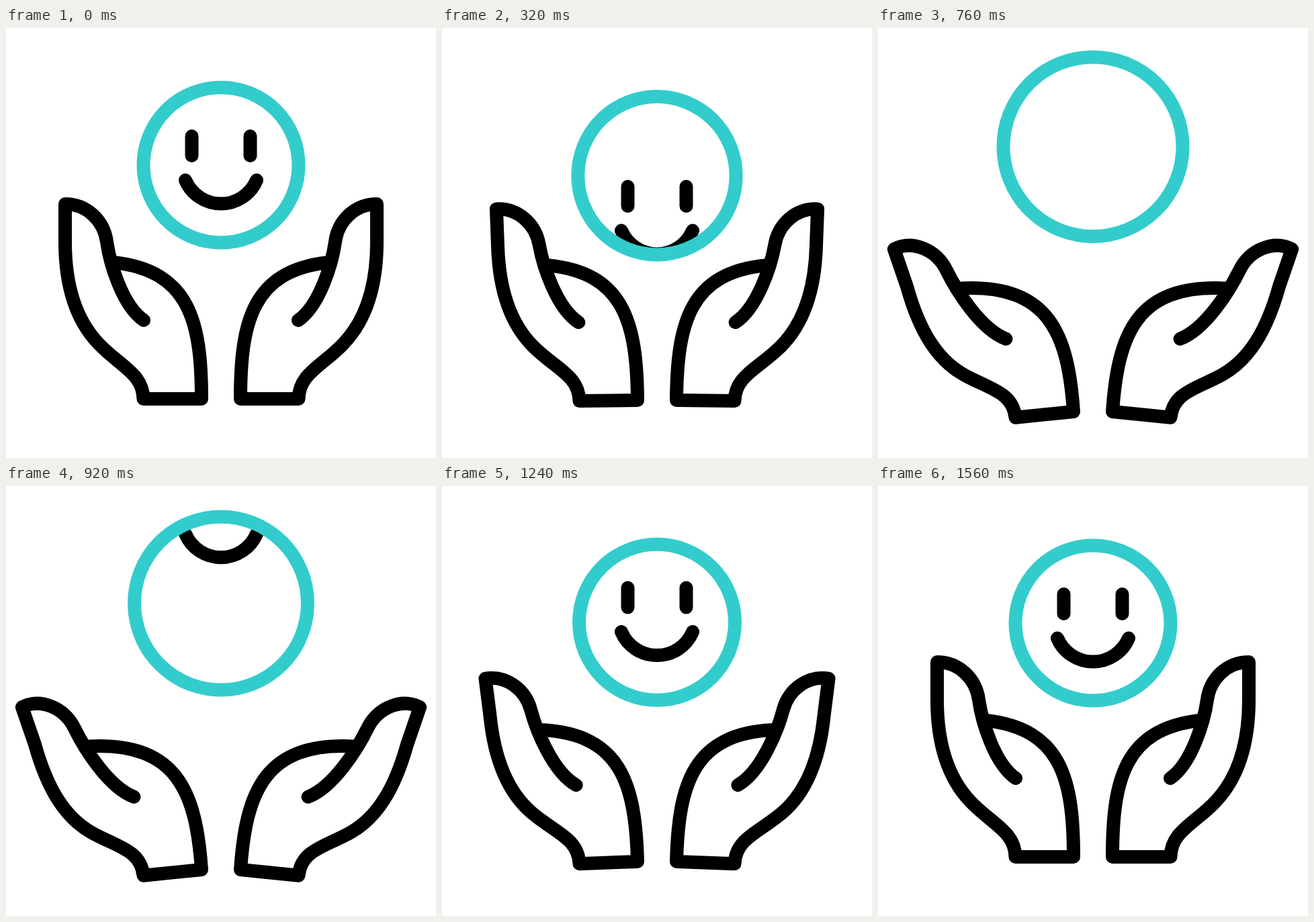
Animation of 640x640 px, one loop 1720 ms. Source, as an HTML page:

```html
<!DOCTYPE html>
<html lang="en">
<head>
<meta charset="utf-8">
<title>Caring hands</title>
<style>
  html, body { margin: 0; width: 100%; height: 100%; overflow: hidden; background: #fff; }
  svg { display: block; width: 100%; height: 100%; }
  path, circle { fill: none; stroke: #000; stroke-width: 20; stroke-linecap: round; stroke-linejoin: round; }
  #ring { stroke: #33cccc; }
</style>
</head>
<body>
<svg viewBox="0 0 640 640">
  <clipPath id="clip"><circle id="disc" cx="320"/></clipPath>
  <g clip-path="url(#clip)">
    <path id="face" d="M276.5 161V190M363.5 161V190M267 226.5A57.6 57.6 0 0 0 373 226.5"/>
  </g>
  <circle id="ring" cx="320"/>
  <path id="left"/>
  <path id="right" transform="translate(640) scale(-1 1)"/>
</svg>
<script>
const LOOP = 1720, STEP = 40;
const $ = id => document.getElementById(id);

// One stroke: crease, fingertip, outer edge, wrist, thumb.
const HAND = 'M205,435 C173,413 154.5,350 150,318 S120,262 88,262 L88,318 ' +
  'C88,384 104,434 137,469 S204,514 204.5,552 L291,552 C291,435 272,362 162,349';

// Leans the hand outwards: more so far from the inner wrist corner.
function bend(x, y, amount) {
  const w = (291 - x) / 203, h = (552 - y) / 290;
  const dx = -20 * h - 44 * h * h * w * (3 - 2 * w);
  const dy = 19 + 48 * w * w;
  return `${x + dx * amount},${y + dy * amount}`;
}

const handPath = amount =>
  HAND.replace(/([\d.]+),([\d.]+)/g, (_, x, y) => bend(+x, +y, amount));

const progress = (t, from, to) => Math.min(1, Math.max(0, (t - from) / (to - from)));

function ease(t, from, to) {
  const u = progress(t, from, to), n = 2.1;
  return u < .5 ? (2 * u) ** n / 2 : 1 - (2 - 2 * u) ** n / 2;
}

function draw(t) {
  const open = 1.01 * (ease(t, 165, 805) - ease(t, 875, 1515));
  const ballY = 19 * ease(t, 40, 440) - 50 * ease(t, 440, 840) + 31 * ease(t, 840, 1310);
  const radius = 115.5 + 18.5 * (ease(t, 200, 680) - ease(t, 680, 1320));
  // The face sinks out of the ball, then drops back in from above.
  const faceY = t < 800
    ? ballY + 178 * ease(t, 40, 720)
    : -230 * (1 - progress(t, 840, 1400)) ** 2.55;

  for (const id of ['ring', 'disc']) {
    $(id).setAttribute('cy', 204 + ballY);
    $(id).setAttribute('r', radius);
  }
  $('face').setAttribute('transform', `translate(0 ${faceY})`);
  for (const id of ['left', 'right']) $(id).setAttribute('d', handPath(open));
}

const start = performance.now();
function frame() {
  const t = (performance.now() - start) % LOOP;
  draw(Math.floor(t / STEP) * STEP);
  requestAnimationFrame(frame);
}
frame();
</script>
</body>
</html>
```
